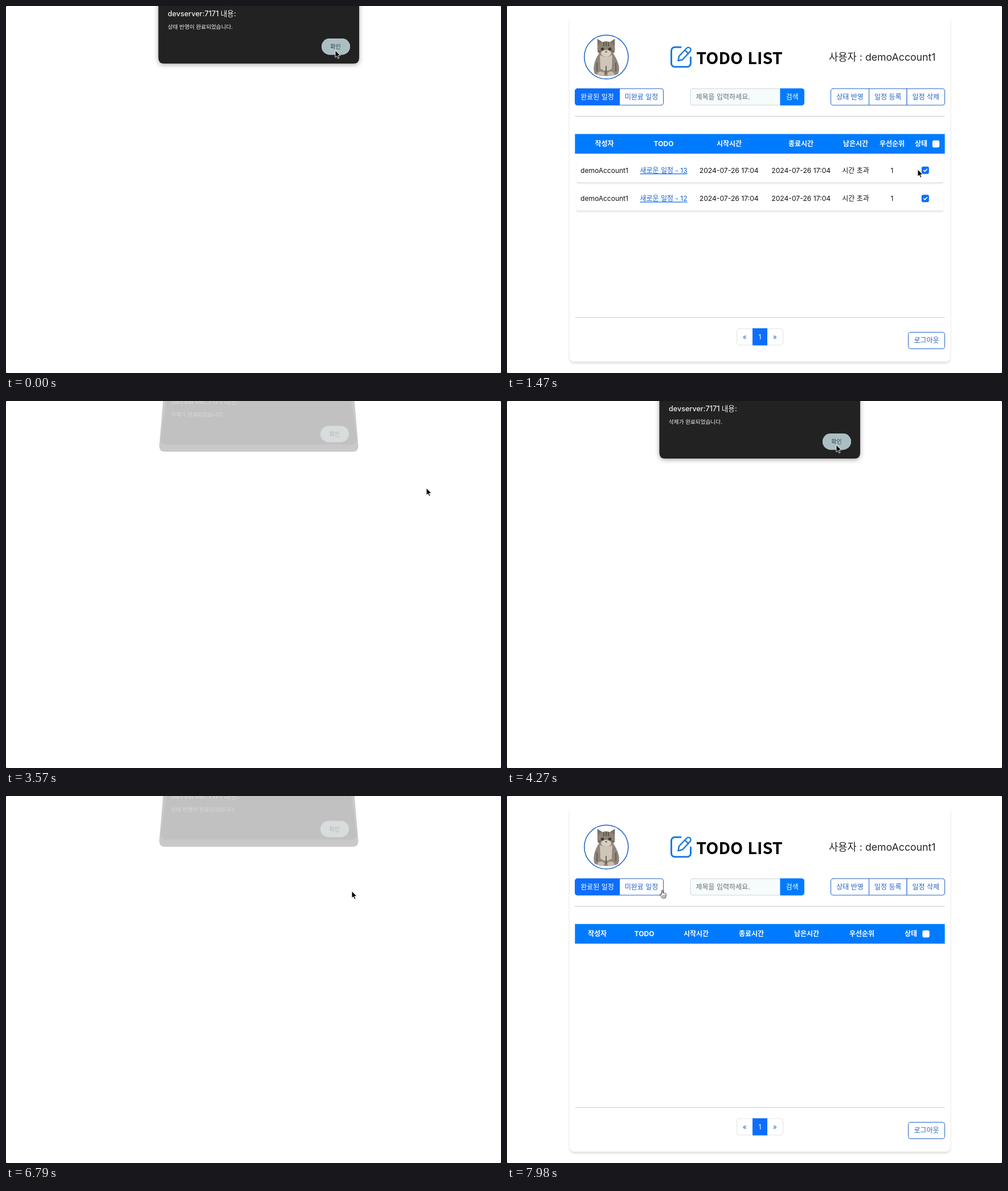
These frames come from a looping animation (869x644 px, 8 s). An HTML page:

```html
<!DOCTYPE html>
<html lang="ko">
<head>
<meta charset="utf-8">
<style>
  html, body { margin: 0; width: 100%; height: 100%; overflow: hidden; background: #555; }
  svg { display: block; width: 869px; height: 644px; background: #fff; border-radius: 2px; }
  text { font-family: Inter, "Noto Sans CJK KR", "Noto Sans CJK", sans-serif; white-space: pre; }
  .card { filter: drop-shadow(0 3.5px 2.2px rgba(0, 0, 0, .13)); }
  .row { filter: drop-shadow(0 3.5px 1.3px rgba(0, 0, 0, .09)); }
  .sheet { filter: drop-shadow(0 2px 4px rgba(0, 0, 0, .35)); }
</style>
</head>
<body>
<svg id="stage" viewBox="0 0 869 644"></svg>
<script>
const LOOP = 8000, STEP = 70;
const BLUE = '#0d6efd', HEAD = '#007bff', LINE = '#2262c6', LINK = '#0b66d8';
const USER = 'demoAccount1', HOST = 'devserver:7171';
const stage = document.getElementById('stage');

// [start, active tab, rows]; a null tab is a blank page
const pages = [
  [0, null], [280, 1, []], [770, 0, [13, 12]], [3430, null],
  [4620, 0, [13]], [6720, null], [7700, 0, []]
];
const unchecked = [[1820, 3430], [5390, 6720]];
const dialogs = [
  [-1000, 70, '상태 반영이 완료되었습니다.'],
  [3500, 4480, '삭제가 완료되었습니다.'],
  [6720, 7560, '상태 반영이 완료되었습니다.']
];
// [time, x, y]
const pointer = [
  [0, 578, 78], [210, 578, 78], [700, 160, 160], [910, 160, 160], [1470, 721, 287],
  [1750, 733, 288], [2100, 733, 288], [2520, 606, 155], [2590, 605, 160], [2800, 507, 228],
  [2940, 604, 163], [3150, 604, 163], [3360, 738, 153], [3710, 738, 153], [4200, 578, 77],
  [4480, 578, 78], [5040, 690, 190], [5250, 730, 288], [5390, 737, 292], [5600, 733, 289],
  [5880, 733, 289], [6370, 607, 167], [6930, 607, 167], [7350, 578, 78], [7630, 578, 78],
  [7980, 268, 165]
];
// [label, x, width, left radius, right radius]
const buttons = [
  ['완료된 일정', 119.5, 78, 4, 0], ['미완료 일정', 197.5, 77, 0, 4], ['검색', 480, 41.5, 0, 4],
  ['상태 반영', 568.5, 67, 4, 0], ['일정 등록', 635.5, 66.5, 0, 0], ['일정 삭제', 702, 66.5, 0, 4]
];
const titles = ['작성자', 'TODO', '시작시간', '종료시간', '남은시간', '우선순위', '상태'];
const wideCols = [171, 275, 390, 516, 612, 676, 727, 753];
const emptyCols = [158.5, 241, 332, 429, 526, 623, 709, 735.5];

const clamp = v => Math.min(1, Math.max(0, v));
const inSpan = (t, [a, b]) => t >= a && t < b;

function text(x, y, str, { size = 12, fill = '#111', weight = 400, anchor = 'middle', more = '' } = {}) {
  return `<text x="${x}" y="${y + size * .37}" font-size="${size}" font-weight="${weight}" fill="${fill}" text-anchor="${anchor}" ${more}>${str}</text>`;
}
function rect(x, y, w, h, r, fill, more = '') {
  return `<rect x="${x}" y="${y}" width="${w}" height="${h}" rx="${r}" fill="${fill}" ${more}/>`;
}
function path(d, fill, stroke = 'none', width = 1) {
  return `<path d="${d}" fill="${fill}" stroke="${stroke}" stroke-width="${width}" stroke-linejoin="round" stroke-linecap="round"/>`;
}
function ellipse(x, y, rx, ry, fill) {
  return `<ellipse cx="${x}" cy="${y}" rx="${rx}" ry="${ry}" fill="${fill}"/>`;
}
function box(x, y, w, h, l, r, fill, stroke) {
  return path(`M${x + l} ${y}h${w - l - r}a${r} ${r} 0 0 1 ${r} ${r}v${h - 2 * r}a${r} ${r} 0 0 1 ${-r} ${r}` +
    `h${l + r - w}a${l} ${l} 0 0 1 ${-l} ${-l}v${2 * l - h}a${l} ${l} 0 0 1 ${l} ${-l}z`, fill, stroke);
}

function pointerAt(t) {
  const i = pointer.findIndex(k => k[0] > t);
  if (i < 1) return i ? pointer.at(-1).slice(1) : pointer[0].slice(1);
  const [a, x0, y0] = pointer[i - 1], [b, x1, y1] = pointer[i];
  const u = (t - a) / (b - a), e = u * u * (3 - 2 * u);
  return [x0 + (x1 - x0) * e, y0 + (y1 - y0) * e];
}
const buttonAt = ([x, y]) => y < 145 || y > 174 ? -1 : buttons.findIndex(b => x >= b[1] && x < b[1] + b[2]);

function button(i, tab, hovered, ringed) {
  const [label, x, w, l, r] = buttons[i], cx = x + w / 2, cy = 159.5;
  const full = i === tab || i === 2 || hovered;
  const fill = !full ? '#fff' : i === 2 ? HEAD : BLUE;
  const ring = ringed ? rect(x - 1.5, 143.5, w + 3, 32, 5, 'none', 'stroke="#0d6efd" stroke-opacity=".45" stroke-width="3"') : '';
  const scale = hovered ? `transform="translate(${cx} ${cy}) scale(1.05) translate(${-cx} ${-cy})"` : '';
  return `<g ${scale}>${ring}${box(x, 145, w, 29, l, r, fill, full ? fill : LINE)}` +
    `${text(cx, cy, label, { fill: full ? '#fff' : LINE })}</g>`;
}

function checkbox(x, y, on) {
  if (on) return rect(x - 6.5, y - 6.5, 13, 13, 3, BLUE) + path(`M${x - 2.8} ${y}l2 2.1l3.8-4`, 'none', '#fff', 1.6);
  return rect(x - 9.5, y - 9.5, 19, 19, 5, '#c2dafd') + rect(x - 6, y - 6, 12, 12, 3, '#fff', 'stroke="#86b7fe"');
}

function avatar() {
  return path('M159 77L158.5 57.5L168 63.5H180L189.5 57.5L189 77Z', '#7d7368') +
    path('M161 84C153 96 150 110 154 119Q174 126 194 120C200 112 196 98 187 84Z', '#90867a') +
    path('M163 86Q174 92 185 86L184 110Q174 117 164 110Z', '#cfc5b8') +
    path('M158 100v14M191 100v14M174 106v13', 'none', '#665e54', 2) +
    ellipse(174, 75.5, 15.5, 13.5, '#8e8377') + ellipse(174, 83, 9, 6, '#d8cfc4') +
    path('M170 64v6M174 63v7M178 64v6M160 80l4-1M188 80l-4-1', 'none', '#564f46', 1.6) +
    ellipse(167.5, 75.5, 2.8, 2.6, '#3f3a2a') + ellipse(180.5, 75.5, 2.8, 2.6, '#3f3a2a') +
    ellipse(174, 80.5, 2, 1.4, '#a76e60') +
    ellipse(165, 119, 6, 4, '#c8beb0') + ellipse(182, 119, 6, 4, '#c8beb0') +
    '<circle cx="174.3" cy="89.5" r="38.6" fill="none" stroke="#1c5fc4" stroke-width="1.5"/>';
}

function icon() {
  const blue = '#1a7ae2';
  return path('M305 72.3H294.5a6 6 0 0 0-6 6v22.5a6 6 0 0 0 6 6h22a6 6 0 0 0 6-6V90', 'none', blue, 3) +
    path('M300.5 96l1.6-8L315.4 74a4 4 0 0 1 6 5.8L308.3 94zM312.3 77.4l5.8 5.8', 'none', blue, 2.5);
}

function tableRow(number, i, checked) {
  const y = 288.5 + i * 49.5, date = '2024-07-26 17:04', dateStyle = { size: 12.15 };
  return rect(122, y - 18, 644, 38.5, 3, '#fff', 'class="row"') +
    text(171, y, USER) +
    text(275, y, `새로운 일정 - ${number}`, { fill: LINK, more: 'text-decoration="underline"' }) +
    text(389.7, y, date, dateStyle) + text(516.2, y, date, dateStyle) +
    text(612, y, '시간 초과') + text(676, y, '1') +
    checkbox(734.3, y - .2, checked);
}

function page(t, tab, rows) {
  const hover = buttonAt(pointerAt(t - STEP));
  const order = buttons.map((_, i) => i).sort((a, b) => (a === hover) - (b === hover));
  const cols = rows.length ? wideCols : emptyCols;
  const off = unchecked.some(span => inSpan(t, span));
  const white = { fill: '#fff', weight: 700 };
  return rect(110, 18, 668, 606, 8, '#fff', 'class="card"') + avatar() + icon() +
    text(408, 91.5, 'TODO LIST', { size: 28.8, weight: 700, fill: '#000', more: 'style="font-family:\'Noto Sans CJK KR\',\'Noto Sans CJK\',\'Noto Sans\',sans-serif"' }) +
    text(752.5, 89.5, `사용자 : ${USER}`, { size: 17.7, fill: '#212529', anchor: 'end' }) +
    box(322, 145, 158, 29, 4, 0, '#f6fbfb', '#ced4da') +
    text(331.5, 159.5, '제목을 입력하세요.', { fill: '#666c72', anchor: 'start' }) +
    order.map(i => button(i, tab, i === hover, i === 3 && inSpan(t, [6510, 6720]))).join('') +
    rect(119.5, 193, 649, 1, 0, '#c8c9ca') + rect(119.5, 546, 649, 1, 0, '#c8c9ca') +
    rect(119.3, 224.6, 649.3, 34.5, 0, HEAD) +
    titles.map((s, i) => text(cols[i], 242, s, white)).join('') +
    rect(cols[7] - 6.2, 235.8, 12.4, 12.4, 3, '#fff') +
    rows.map((n, i) => tableRow(n, i, i > 0 || !off)).join('') +
    box(403.5, 566, 81, 29, 4, 4, '#fff', '#dee2e6') + rect(431, 565.5, 26, 30, 0, BLUE) +
    text(417.3, 580.5, '«', { fill: LINE }) + text(444, 580.5, '1', { fill: '#fff' }) + text(470.3, 580.5, '»', { fill: LINE }) +
    box(704.5, 572.5, 64, 29, 4, 4, '#fff', LINE) + text(736.5, 587, '로그아웃', { fill: LINE });
}

// The sheet tips away from the viewer and slides up while it is translucent.
function dialog(t, [open, close, message]) {
  const shown = Math.min(clamp((t - open) / 290), 1 - clamp((t - close) / 210));
  if (shown <= 0) return '';
  const q = (1 - shown) / .76;
  const sheet = (top, side, bottom) => `M${top} -14L${side} ${bottom - 10}Q${side} ${bottom} ${side + 10} ${bottom}` +
    `H${877.5 - side}Q${887.5 - side} ${bottom} ${887.5 - side} ${bottom - 10}L${887.5 - top} -14Z`;
  const dark = path(sheet(267.5 + 9.5 * q, 267.5 + 1.5 * q, 101 - 12 * q), '#222');
  const inner = q > 0 ? `<g opacity="${shown * .16}">${path(sheet(267.5 + 16 * q, 267.5 + 4 * q, 101 - 24.5 * q), '#000')}</g>` : '';
  const dx = 6 * q, dy = -13.3 * q;
  return `<g opacity="${shown}"><g ${q ? '' : 'class="sheet"'}>${dark}</g></g>${inner}` +
    `<g opacity="${Math.sqrt(shown)}">` +
    text(284 + dx, 13.3 + dy, `${HOST} 내용:`, { size: 12.6, weight: 500, fill: '#f1f1f1', anchor: 'start' }) +
    text(284 + dx * .9, 36.5 + dy, message, { size: 9.6, fill: '#f1f1f1', anchor: 'start' }) + '</g>' +
    `<g opacity="${shown}">` + rect(554 - 2 * q, 57 + dy, 50, 28.5, 14.2, q > 0 ? '#fff' : '#abbfc3') +
    rect(554 - 2 * q, 57 + dy, 50, 28.5, 14.2, '#abbfc3') + '</g>' +
    (q > 0 ? `<g opacity="${(1 - shown) * .7}">${rect(554 - 2 * q, 57 + dy, 50, 28.5, 14.2, '#f4f6f7')}</g>` : '') +
    `<g opacity="${shown}">${text(578.5 - 2 * q, 71.3 + dy, '확인', { size: 10, weight: 500, fill: '#34474c' })}</g>`;
}

function cursor(t, hasPage) {
  const [x, y] = pointerAt(t), hand = hasPage && buttonAt([x, y]) >= 0;
  const shape = hand
    ? path('M3.2 8V1.6a1.2 1.2 0 0 1 2.4 0V5.4c.5-.6 1.7-.5 2 .2c.6-.5 1.7-.3 1.9.5c.7-.4 1.7.1 1.7 1.1V10c0 1.6-1 2-1 4H4.4C4 12 1.6 10 .6 8.2C0 7 1.4 6.5 2.2 7.3Z', '#fff', '#111', .9) +
      path('M5.5 9.2v2.6M7.3 9.2v2.6M9 9.2v2.6', 'none', '#111', .6)
    : path('M0 0V12.3l2.8-2.6 2 4.5 2.1-.9-2-4.4h3.9z', '#000', '#fff', .9);
  return `<g transform="translate(${x} ${y})">${shape}</g>`;
}

function draw(t) {
  const [, tab, rows] = pages.findLast(p => p[0] <= t);
  const hasPage = tab !== null;
  stage.innerHTML = (hasPage ? page(t, tab, rows) : '') +
    dialogs.map(d => dialog(t, d)).join('') + cursor(t, hasPage);
}

const start = performance.now();
let last = -1;
function tick() {
  const t = Math.floor((performance.now() - start) % LOOP / STEP) * STEP;
  if (t !== last) draw(last = t);
  requestAnimationFrame(tick);
}
tick();
</script>
</body>
</html>
```
